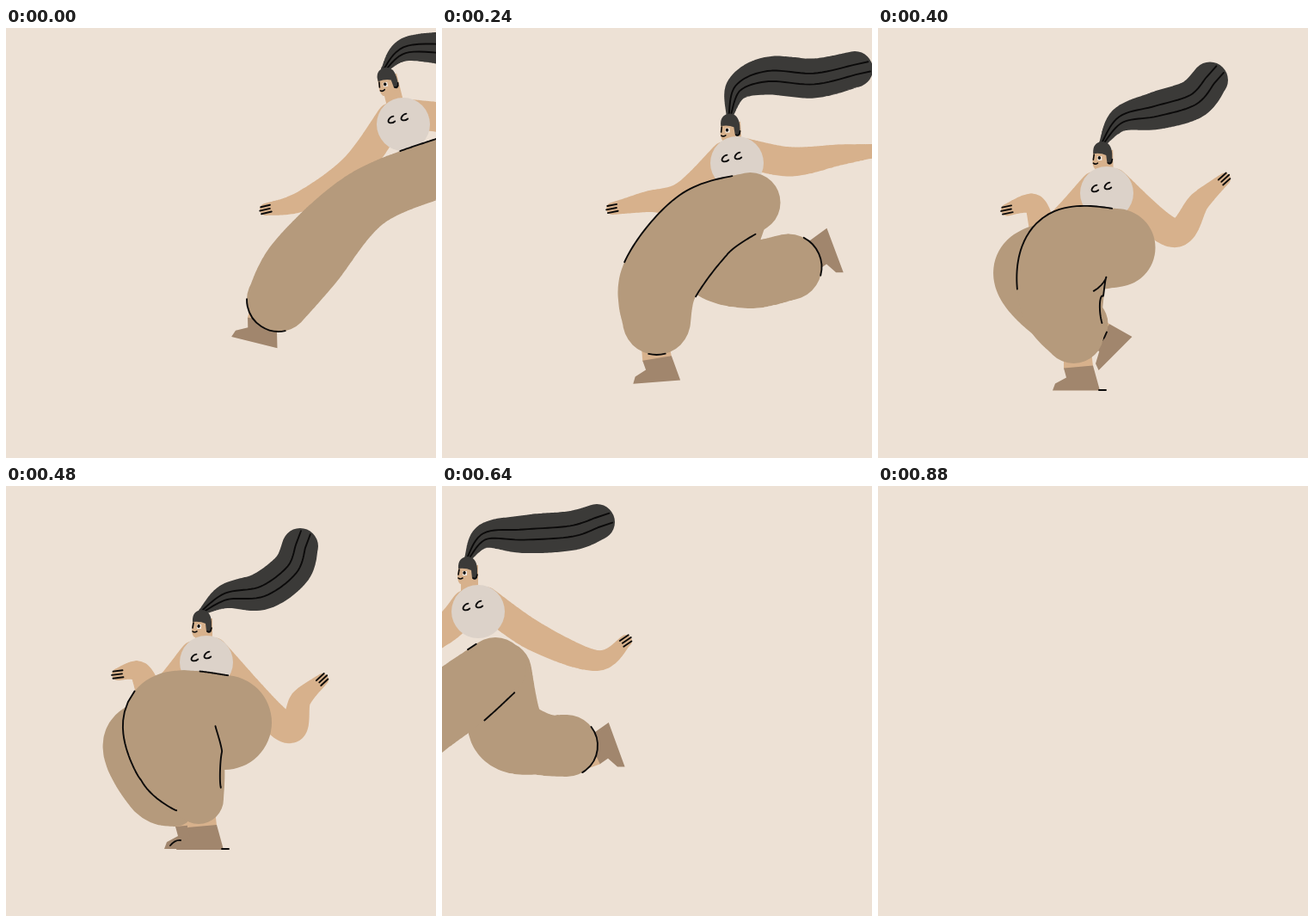
These frames come from a looping animation (500 by 500 pixels, 1040 ms). An HTML page with a canvas:

```html
<!DOCTYPE html>
<html lang="en">
<head>
<meta charset="utf-8">
<title>Leap</title>
<style>
  html, body { margin: 0; height: 100%; overflow: hidden; background: #ede1d5; }
  canvas { display: block; width: 100vw; height: 100vh; }
</style>
</head>
<body>
<canvas id="stage"></canvas>
<script>
const STEP = 80, LOOP = 1040;
const BG = '#ede1d5', SKIN = '#d7b18c', PANTS = '#b59a7c', SHOE = '#a1866d',
      HAIR = '#3b3a38', TOP = '#dcd2c9', INK = '#0b0a0a';
const HAIR_R = [4, 14, 22, 23, 21], ARM_R = [17, 17, 12, 7], TORSO_R = 31;

// Joints of the rig. Legs: x, y, radius from hip to ankle. Feet and head: x, y, turn.
// seam, crease: stretches (0 to 1) inked along the outer and inner edge of the front leg.
// cuff: half angle of the ankle arcs, front and rear.
const fly = {
  head: [440, 46, -14], torso: [462, 112], hair: [468, 24, 540, 26, 570, 28, 590, 30],
  armL: [405, 163, 345, 201, 302, 211], armR: [540, 104, 590, 80, 620, 65],
  front: [520, 158, 34, 420, 198, 35, 348, 272, 43, 317, 316, 37], frontFoot: [298, 339, 14],
  rear: [560, 165, 36, 590, 210, 40, 640, 215, 36, 680, 190, 36], rearFoot: [700, 170, -131],
  seam: [0, 0.18], cuff: [0.9, 0.9]
};
const reach = {
  head: [375, 79, -4], torso: [387, 135], hair: [379, 55, 408, 41, 465, 48, 530, 45],
  armL: [340, 162, 270, 210, 226, 216], armR: [450, 116, 520, 140, 585, 158],
  front: [417, 170, 34, 352, 207, 39, 285, 280, 44, 268, 335, 38], frontFoot: [262, 375, -9],
  rear: [415, 190, 36, 426, 254, 48, 472, 271, 36, 530, 240, 38], rearFoot: [558, 212, -131],
  seam: [0.08, 0.33], crease: [0, 0.33], cuff: [0.5, 0.9]
};
const stand = {
  head: [294, 120, -2], torso: [299, 179], hair: [309, 84, 350, 70, 400, 69, 430, 51],
  armL: [224, 228, 207, 194, 170, 204], armR: [360, 195, 405, 155, 438, 126],
  front: [300, 236, 36, 252, 254, 50, 222, 305, 48, 231, 346, 41], frontFoot: [238, 392, 0],
  rear: [265, 245, 40, 209, 266, 53, 240, 300, 45, 276, 316, 39], rearFoot: [302, 320, -90],
  seam: [0.06, 1], crease: [0.12, 1], cuff: [0, 0.45], skid: [263, 420]
};
const crouch = {
  head: [228, 144, 0], torso: [233, 205], hair: [256, 128, 298, 122, 332, 97, 342, 70],
  armL: [176, 246, 155, 216, 130, 219], armR: [325, 281, 343, 248, 368, 225],
  front: [254, 275, 55, 192, 272, 54, 204, 325, 50, 224, 364, 29], frontFoot: [228, 395, 0],
  rear: [220, 270, 40, 152, 296, 38, 175, 350, 38, 196, 372, 24], rearFoot: [214, 394, 0],
  seam: [0, 0.18, 0.34, 1], crease: [0.5, 1], cuff: [0, 0], skid: [251, 422]
};
const push = {
  head: [126, 107, 0], torso: [136, 171], hair: [165, 119, 200, 131, 232, 130, 255, 128],
  armL: [118, 185, 116, 200, 122, 222], armR: [226, 238, 290, 262, 318, 241],
  front: [168, 234, 46, 134, 276, 40, 162, 327, 36, 206, 347, 37], frontFoot: [236, 378, -40],
  rear: [142, 252, 45, 116, 290, 41, 144, 336, 33, 198, 372, 23], rearFoot: [206, 393, 0],
  seam: [0, 0.05, 0.12, 1], crease: [0, 0.4], cuff: [0, 0], skid: [220, 421]
};
const launch = {
  head: [30, 82, 0], torso: [42, 146], hair: [50, 58, 95, 56, 150, 52, 180, 42],
  armL: [5, 165, -50, 200, -95, 215], armR: [108, 175, 180, 203, 214, 180],
  front: [62, 212, 36, 20, 245, 40, -40, 290, 42, -50, 330, 38], frontFoot: [-60, 372, 0],
  rear: [70, 215, 34, 75, 282, 44, 115, 300, 36, 145, 302, 36], rearFoot: [176, 308, -110],
  seam: [0, 0.1], crease: [0, 0.3], cuff: [0.8, 0.85]
};
const trail = {
  rear: [-40, 170, 36, -8, 243, 44, 40, 252, 45, 74, 229, 42], rearFoot: [114, 201, -135],
  cuff: [0, 0.85]
};

function between(a, b) {
  const out = {};
  for (const part in a)
    if (b[part]) out[part] = a[part].slice(0, b[part].length).map((v, i) => (v + b[part][i]) / 2);
  return out;
}
// The trailing leg glides out of view
function slide({ rear, rearFoot, cuff }, dx) {
  const move = n => n.map((v, i) => i % 3 ? v : v + dx);
  return { rear: move(rear), rearFoot: move(rearFoot), cuff };
}

const steps = [fly, between(fly, reach), reach, between(reach, stand), stand,
  between(stand, crouch), crouch, push, launch, trail, slide(trail, -95), {}];

const canvas = document.getElementById('stage');
const g = canvas.getContext('2d');

const rows = (n, k) => Array.from({ length: n.length / k }, (_, i) => n.slice(i * k, i * k + k));
const limb = (root, n, radii) => [root, ...rows(n, 2)].map((p, i) => [...p, radii[i]]);

// Point, radius and outward normal on the spline through the joints
function sample(joints, t) {
  const last = joints.length - 1;
  const i = Math.min(Math.floor(t * last), last - 1), u = t * last - i;
  const at = k => joints[Math.max(0, Math.min(last, k))];
  const [v, s] = [[], []];
  for (let c = 0; c < 3; c++) {
    const [p, a, b, q] = [at(i - 1)[c], at(i)[c], at(i + 1)[c], at(i + 2)[c]];
    const k1 = b - p, k2 = 2 * p - 5 * a + 4 * b - q, k3 = 3 * (a - b) + q - p;
    v[c] = a + u * (k1 + u * (k2 + u * k3)) / 2;
    s[c] = k1 + u * (2 * k2 + 3 * u * k3);
  }
  const len = Math.hypot(s[0], s[1]) || 1;
  return { x: v[0], y: v[1], r: v[2], nx: -s[1] / len, ny: s[0] / len };
}
function tube(joints, color) {
  g.beginPath();
  for (let i = 0; i <= 100; i++) {
    const { x, y, r } = sample(joints, i / 100);
    g.moveTo(x + r, y);
    g.arc(x, y, r, 0, 7);
  }
  g.fillStyle = color;
  g.fill();
}
// Ink at a share of the radius beside the spine
function edge(joints, side, from, to, tail = 0) {
  g.beginPath();
  for (let i = 0; i <= 40; i++) {
    const { x, y, r, nx, ny } = sample(joints, from + (to - from) * i / 40);
    g.lineTo(x + nx * r * side, y + ny * r * side);
    if (i === 40 && tail) g.lineTo(x + nx * r * side + ny * tail, y + ny * r * side - nx * tail);
  }
  g.stroke();
}
function path(d, color) {
  const p = new Path2D(d);
  if (color) { g.fillStyle = color; g.fill(p); } else g.stroke(p);
}
function place(x, y, turn, paint) {
  g.save();
  g.translate(x, y);
  g.rotate(turn * Math.PI / 180);
  paint();
  g.restore();
}

function hair(joints) {
  tube(joints, HAIR);
  for (const side of [0.3, -0.25]) edge(joints, side, 0, 1, 17);
}
function head() {
  path('M-11 12 L-12 24 Q-11 32 -8 32 L-8 46 H12 V10 Z', SKIN);
  path('M-11 14 Q-12 1 0 0 Q10 1 11 14 V25 Q8 29 5 25 L4 16 Q-2 13 -11 14 Z', HAIR);
  path('M-6 17 h5 v5 h-5 Z', '#f3ece5');
  path('M-4 17 a1.7 2 0 1 0 .1 0 Z', INK);
  g.lineWidth = 1.6;
  path('M-10 15 L-11 21 M-11 25 Q-9 27 -6 25 M6 25 Q10 27 11 21');
}
function arm(joints) {
  tube(joints, SKIN);
  const { x, y, nx, ny } = sample(joints, 1);
  place(x, y, Math.atan2(-nx, ny) * 180 / Math.PI, () => path('M-6 -4 H6 M-5 0 H7 M-6 4 H5'));
}
function torso(x, y) {
  g.beginPath();
  g.arc(x, y, TORSO_R, 0, 7);
  g.fillStyle = TOP;
  g.fill();
  for (const [dx, dy] of [[-14, -5], [1, -8]])
    place(x + dx, y + dy, -8, () => path('M3 -4 C-2 -4 -6 2 -2 3 Q1 4 4 2'));
}
function leg(joints, [x, y, turn], cuff, toe) {
  place(x, y, turn, () => {
    path('M-17 -18 H15 L17 0 L-17 3 Z', SKIN);
    path('M-17 2 L17 -1 L25 28 H-30 L-27 20 L-14 13 Z', SHOE);
    if (toe) path('M-23 24 Q-17 17 -11 18');
  });
  tube(joints, PANTS);
  if (!cuff) return;
  const [cx, cy, r] = joints[joints.length - 1];
  const aim = Math.atan2(y - cy, x - cx);
  g.beginPath();
  g.arc(cx, cy, r, aim - cuff, aim + cuff);
  g.stroke();
}

function draw(p) {
  const k = canvas.width / 500;
  g.setTransform(k, 0, 0, k, 0, 0);
  g.fillStyle = BG;
  g.fillRect(0, 0, 500, 500);
  g.strokeStyle = INK;
  g.lineCap = g.lineJoin = 'round';
  g.lineWidth = 1.9;

  if (p.head) {
    const [hx, hy, turn] = p.head, [x, y] = p.torso;
    hair(limb([hx, hy + 2], p.hair, HAIR_R));
    place(hx, hy, turn, head);
    arm(limb([x + 8, y - 12], p.armR, ARM_R));
    arm(limb([x - 14, y - 8], p.armL, ARM_R));
    torso(x, y);
  }
  if (p.rear) leg(rows(p.rear, 3), p.rearFoot, p.cuff[1], p.rearFoot[2] === 0);
  if (p.front) {
    const joints = rows(p.front, 3);
    leg(joints, p.frontFoot, p.cuff[0]);
    for (const [from, to] of rows(p.seam, 2)) edge(joints, 1, from, to);
    if (p.crease) edge(joints, -1, ...p.crease);
  }
  if (p.skid) place(...p.skid, 0, () => path('M0 0 H8'));
}

canvas.width = canvas.height = Math.round(500 * (window.devicePixelRatio || 1));
const start = performance.now();
function tick() {
  const t = Math.max(0, performance.now() - start) % LOOP;
  draw(steps[Math.min(steps.length - 1, Math.floor(t / STEP))]);
  requestAnimationFrame(tick);
}
tick();
</script>
</body>
</html>
```
